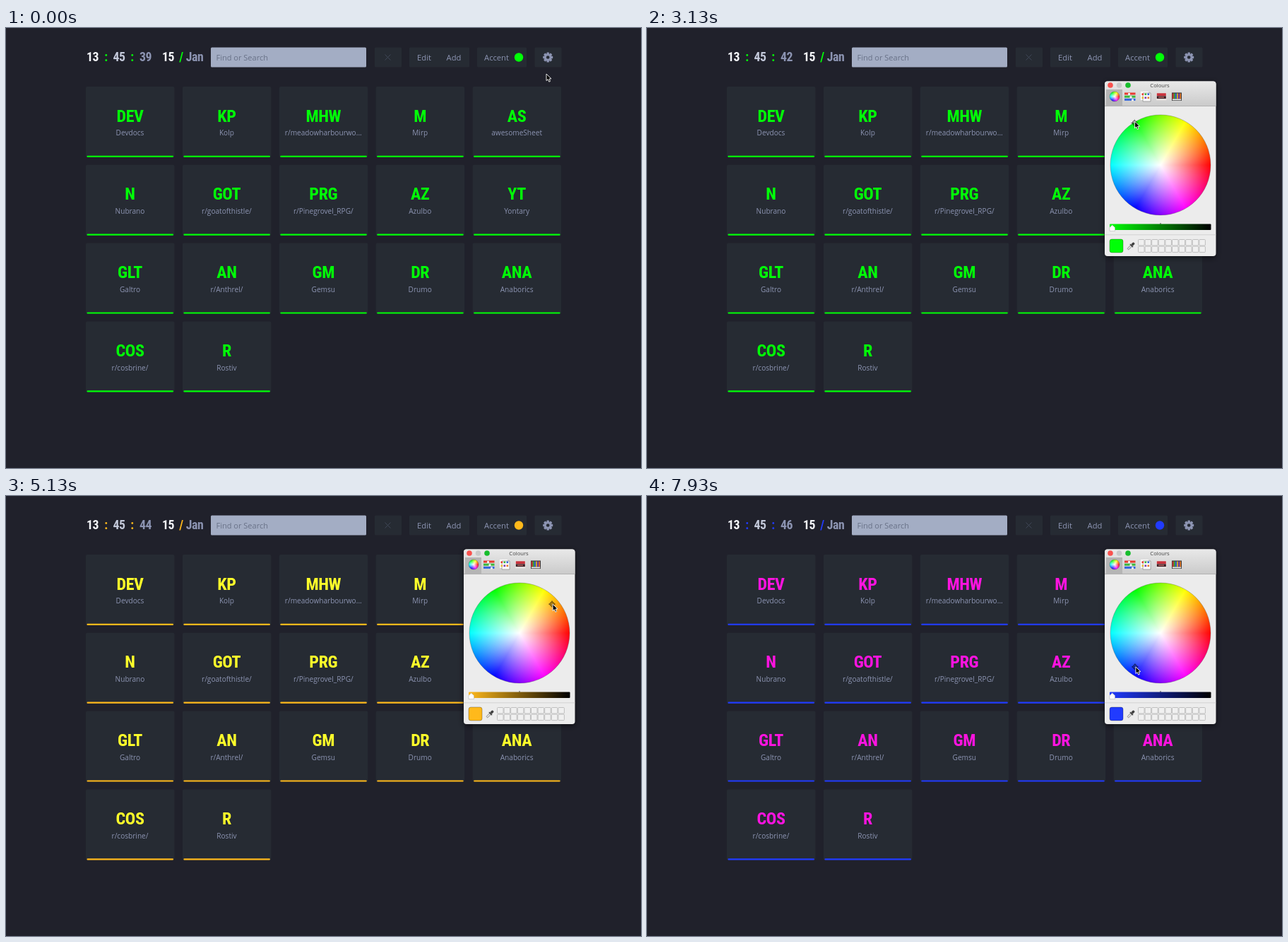
Animation of 899 by 623 pixels, one loop 8000 ms. Source, as an HTML page with a canvas:

```html
<!DOCTYPE html>
<html lang="en">
<head>
<meta charset="utf-8">
<title>Start page accent colour</title>
<style>
  html, body { margin: 0; width: 100%; height: 100%; overflow: hidden; background: #20212b; }
  canvas { display: block; }
</style>
</head>
<body>
<canvas id="stage" width="899" height="623"></canvas>
<script>
const ctx = document.getElementById('stage').getContext('2d');
const LOOP = 8000;
const PANEL_OPENS = 800;
const DRAG_STARTS = 3200;
const LETTER_LAG = 430;
const WHEEL = { x: 727, y: 194, r: 71 };
const SANS = '"Open Sans", sans-serif';
const MUTED = '#8c94b2';
const SURFACE = '#262b33';

const tiles = [
  ['DEV', 'Devdocs'], ['KP', 'Kolp'], ['MHW', 'r/meadowharbourwo...'], ['M', 'Mirp'], ['AS', 'awesomeSheet'],
  ['N', 'Nubrano'], ['GOT', 'r/goatofthistle/'], ['PRG', 'r/Pinegrovel_RPG/'], ['AZ', 'Azulbo'], ['YT', 'Yontary'],
  ['GLT', 'Galtro'], ['AN', 'r/Anthrel/'], ['GM', 'Gemsu'], ['DR', 'Drumo'], ['ANA', 'Anaborics'],
  ['COS', 'r/cosbrine/'], ['R', 'Rostiv']
];

// [time, hue angle, distance from the wheel's centre]
const colourKeys = [
  [DRAG_STARTS, 121.7, 70], [3800, 98, 49.5], [5130, 41.7, 61.6],
  [5750, 7, 66.6], [6300, 7, 66.6], [7500, -52, 64], [7930, -127, 60]
];
// [time, x, y]
const pointerKeys = [
  [0, 765, 65], [150, 765, 65], [600, 716, 45], [1400, 716, 45],
  [2050, 690, 130], [3050, 690, 130], [DRAG_STARTS, 691, 134]
];

function track(keys, t, ease = u => u) {
  if (t <= keys[0][0]) return keys[0].slice(1);
  const i = keys.findIndex(key => key[0] > t);
  if (i < 0) return keys[keys.length - 1].slice(1);
  const [from, to] = [keys[i - 1], keys[i]];
  const u = ease((t - from[0]) / (to[0] - from[0]));
  return from.slice(1).map((v, n) => v + (to[n + 1] - v) * u);
}
const smooth = u => u * u * (3 - 2 * u);

function hsv(hue, sat) {
  const channel = n => {
    const k = (n + hue / 60 + 6) % 6;
    return Math.round(255 * (1 - sat * Math.max(0, Math.min(k, 4 - k, 1))));
  };
  return `rgb(${channel(5)}, ${channel(3)}, ${channel(1)})`;
}

function accentAt(t) {
  const [hue, r] = track(colourKeys, t);
  const a = hue * Math.PI / 180;
  return {
    x: WHEEL.x + r * Math.cos(a),
    y: WHEEL.y - r * Math.sin(a),
    colour: hsv(hue, Math.min(1, r / 69))
  };
}

// Drawing helpers
function rect(x, y, w, h, fill, radius = 0) {
  ctx.beginPath();
  ctx.roundRect(x, y, w, h, radius);
  ctx.fillStyle = fill;
  ctx.fill();
}

function disc(x, y, r, fill) {
  ctx.beginPath();
  ctx.arc(x, y, r, 0, 2 * Math.PI);
  ctx.fillStyle = fill;
  ctx.fill();
}

function line(points, colour, width = 1) {
  ctx.beginPath();
  points.forEach(([x, y]) => ctx.lineTo(x, y));
  ctx.strokeStyle = colour;
  ctx.lineWidth = width;
  ctx.stroke();
}

function text(str, x, y, font, fill, align = 'center') {
  ctx.font = font;
  ctx.textAlign = align;
  ctx.fillStyle = fill;
  ctx.fillText(str, x, y);
}

function gradient(x0, y0, x1, y1, ...colours) {
  const g = ctx.createLinearGradient(x0, y0, x1, y1);
  colours.forEach((c, i) => g.addColorStop(i / (colours.length - 1), c));
  return g;
}

// Display type: the narrowest bold face available
function narrowType(fn) {
  ctx.save();
  ctx.fontStretch = 'extra-condensed';
  ctx.letterSpacing = '-0.4px';
  const result = fn();
  ctx.restore();
  return result;
}
const displayFont = (size, face) => `bold ${size}px "${face}", sans-serif`;
const widthOf = face => narrowType(() => {
  ctx.font = displayFont(27, face);
  return ctx.measureText('MHW').width;
});
const displayFace = ['Noto Sans', 'Open Sans', 'Roboto', 'Open Sans Condensed', 'Roboto Condensed', 'Liberation Sans Narrow']
  .reduce((best, face) => widthOf(face) < widthOf(best) ? face : best);
const displaySize = Math.min(27, 27 * 50 / widthOf(displayFace));

function display(str, x, middle, scale, fill) {
  const size = displaySize * scale;
  narrowType(() => text(str, x, middle + size * 0.36, displayFont(size, displayFace), fill));
}

function drawGear(x, y) {
  ctx.save();
  ctx.translate(x, y);
  for (let i = 0; i < 8; i++) {
    rect(-1.7, -7, 3.4, 4, MUTED, 0.6);
    ctx.rotate(Math.PI / 4);
  }
  ctx.restore();
  disc(x, y, 5.3, MUTED);
  disc(x, y, 2.3, SURFACE);
}

function drawHeader(t, accent, hovered) {
  const seconds = 39 + Math.floor(t / 1000);
  const clock = [
    ['13', 122.5, '#f4f6fa'], [':', 141.5, accent], ['45', 160, '#c3c9da'], [':', 178.5, accent],
    [Math.min(seconds, 46), 197.5, MUTED], ['15', 229.5, '#f4f6fa'], ['/', 248, accent], ['Jan', 267, MUTED]
  ];
  clock.forEach(([str, x, fill]) => display(str, x, 41, 0.74, fill));

  rect(290, 27.5, 220, 28, '#a3adc4', 1.5);
  text('Find or Search', 297.5, 45.5, `11px ${SANS}`, '#697288', 'left');

  [[522, 38], [571, 85], [667, 70], [748.5, 38]].forEach(([x, w]) => rect(x, 27.5, w, 28, SURFACE, 1.5));
  line([[536.5, 37.5], [544.5, 45.5]], '#3f4657');
  line([[544.5, 37.5], [536.5, 45.5]], '#3f4657');
  text('Edit', 592, 45.5, `11.2px ${SANS}`, MUTED);
  text('Add', 634, 45.5, `11.2px ${SANS}`, MUTED);
  if (hovered) {
    rect(667, 27.5, 70, 28, '#343b47', 1.5);
    rect(667, 53.5, 70, 2, '#a3adc4');
  }
  text('Accent', 694.5, 45.5, `11.2px ${SANS}`, hovered ? '#fff' : MUTED);
  disc(726, 41.5, 6.2, accent);
  drawGear(767.2, 41.5);
}

function drawTiles(accent, letters) {
  tiles.forEach(([initials, name], i) => {
    const x = 113 + (i % 5) * 136.9;
    const y = 83 + Math.floor(i / 5) * 110.8;
    rect(x, y, 125.5, 100, SURFACE, 2);
    rect(x + 1.5, y + 97.8, 122.5, 2.2, accent, 1);
    display(initials, x + 62.5, y + 41, 1, letters);
    text(name, x + 62.5, y + 69.2, `10.1px ${SANS}`, MUTED);
  });
}

function drawWheel(x, y, r) {
  const hues = ctx.createConicGradient(0, x, y);
  for (let i = 0; i <= 6; i++) hues.addColorStop(i / 6, hsv((360 - i * 60) % 360, 1));
  disc(x, y, r, hues);
  const fade = ctx.createRadialGradient(x, y, 0, x, y, r);
  fade.addColorStop(0, '#fff');
  fade.addColorStop(1, 'rgba(255, 255, 255, 0)');
  disc(x, y, r, fade);
  ctx.strokeStyle = 'rgba(70, 70, 70, 0.45)';
  ctx.lineWidth = 0.7;
  ctx.stroke();
}

function drawToolbar() {
  const bright = ['#e83a30', '#3cb83c', '#3467dc', '#e8b930', '#7a3bb0', '#e87830'];
  rect(650, 87, 23, 23, '#b5b5b5');
  drawWheel(662, 97, 7);

  bright.slice(0, 3).forEach((c, i) => {
    rect(676, 91.5 + i * 4.2, 15.5, 3, c);
    rect(681 + i * 2.5, 92 + i * 4.2, 3, 3, '#f4f4f4', 1);
  });

  rect(699, 90, 11, 12, '#fff');
  rect(702, 92, 11, 12, '#fafafa');
  ctx.strokeStyle = '#777';
  ctx.lineWidth = 0.6;
  ctx.stroke();
  bright.forEach((c, i) => rect(700.5 + (i % 3) * 4, 92.5 + Math.floor(i / 3) * 5, 2.6, 2.6, c));

  rect(721, 91.5, 14.5, 11, '#e9e3e0', 1);
  rect(721.8, 92.3, 13, 4, '#c9333d');
  rect(721.8, 96.3, 13, 3.8, '#3c2027');
  rect(724, 97.6, 8, 1, '#e98478');

  rect(743, 91.5, 14, 11.5, '#333');
  bright.forEach((c, i) => rect(743.8 + i * 2.1, 92.5, 1.7, 8, c));
  rect(743.8, 100.5, 12.4, 1.8, '#eee');
}

function drawPipette() {
  ctx.save();
  ctx.translate(685, 309);
  ctx.rotate(Math.PI / 4);
  rect(-1.3, -1, 2.6, 7, '#dedede', 1);
  ctx.strokeStyle = '#777';
  ctx.lineWidth = 0.7;
  ctx.stroke();
  rect(-2.8, -2.2, 5.6, 1.7, '#444');
  rect(-1.8, -6.8, 3.6, 5, '#444', 1.6);
  ctx.restore();
}

function drawPanel(accent) {
  ctx.save();
  ctx.shadowColor = 'rgba(0, 0, 0, 0.6)';
  ctx.shadowBlur = 8;
  ctx.shadowOffsetY = 2;
  rect(648, 75.5, 157.5, 247.5, '#ececec', 4);
  ctx.restore();
  rect(648, 75.5, 157.5, 35, gradient(0, 75, 0, 110, '#e9e9e9', '#cbcbcb'), [4, 4, 0, 0]);
  rect(648, 110, 157.5, 0.8, '#a5a5a5');
  [[656, '#f9524e'], [668.5, '#c9c9c9'], [681, '#17bd2c']].forEach(([x, c]) => disc(x, 81, 3.8, c));
  text('Colours', 726, 84, `7.6px ${SANS}`, '#444');
  drawToolbar();

  drawWheel(WHEEL.x, WHEEL.y, WHEEL.r);
  ctx.beginPath();
  ctx.arc(accent.x, accent.y, 3, 0, 2 * Math.PI);
  ctx.strokeStyle = 'rgba(0, 0, 0, 0.75)';
  ctx.lineWidth = 0.9;
  ctx.stroke();
  line([[accent.x - 5, accent.y], [accent.x + 5, accent.y]], 'rgba(0, 0, 0, 0.7)', 0.8);
  line([[accent.x, accent.y - 5], [accent.x, accent.y + 5]], 'rgba(0, 0, 0, 0.7)', 0.8);

  rect(726.5, 276, 1, 2, '#444');
  rect(655, 277.5, 143.5, 8.5, gradient(655, 0, 798, 0, accent.colour, '#000'), 1);
  ctx.beginPath();
  [[658.7, 279], [662.5, 282.5], [662.5, 287.5], [655, 287.5], [655, 282.5]].forEach(([x, y]) => ctx.lineTo(x, y));
  ctx.closePath();
  ctx.fillStyle = '#fff';
  ctx.fill();
  ctx.strokeStyle = '#aaa';
  ctx.lineWidth = 0.5;
  ctx.stroke();

  rect(648, 292.5, 157.5, 0.8, '#c9c9c9');
  rect(655, 299, 19, 19, accent.colour, 3);
  ctx.strokeStyle = 'rgba(0, 0, 0, 0.35)';
  ctx.lineWidth = 0.8;
  ctx.stroke();
  drawPipette();
  for (let i = 0; i < 20; i++) {
    rect(695.5 + (i % 10) * 9.6, 299.5 + Math.floor(i / 10) * 9.6, 8.5, 8.5, '#f0f0f0', 1);
    ctx.strokeStyle = '#b4b4b4';
    ctx.lineWidth = 0.8;
    ctx.stroke();
  }
}

function drawPointer(x, y) {
  const outline = [[0, 0], [0, 9.6], [2.2, 7.6], [3.8, 11.2], [5.5, 10.4], [4, 7], [7, 6.8]];
  ctx.beginPath();
  outline.forEach(([dx, dy]) => ctx.lineTo(x + dx, y + dy));
  ctx.closePath();
  ctx.fillStyle = '#000';
  ctx.fill();
  ctx.strokeStyle = '#fff';
  ctx.lineWidth = 0.9;
  ctx.stroke();
}

function draw(t) {
  const accent = accentAt(t);
  const [x, y] = t < DRAG_STARTS ? track(pointerKeys, t, smooth) : [accent.x + 1, accent.y];
  const hovered = x > 667 && x < 737 && y > 27 && y < 56;
  rect(0, 0, 899, 623, '#20212b');
  drawHeader(t, accent.colour, hovered);
  drawTiles(accent.colour, accentAt(t - LETTER_LAG).colour);
  if (t >= PANEL_OPENS) drawPanel(accent);
  drawPointer(x, y);
}

const start = performance.now();
function frame() {
  draw((performance.now() - start) % LOOP);
  requestAnimationFrame(frame);
}
frame();
</script>
</body>
</html>
```
